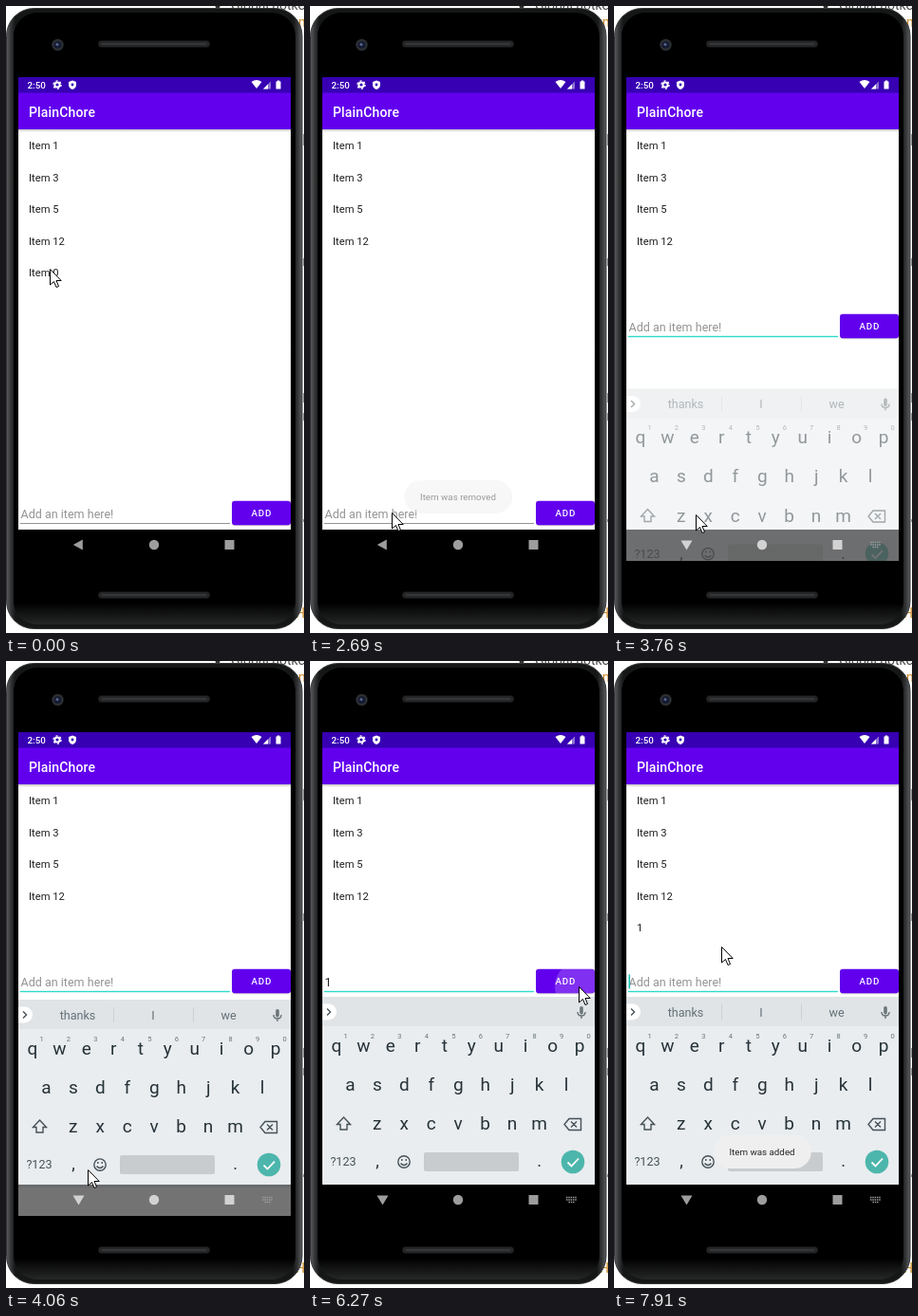
Write an HTML page that moves like this. It is 314 by 661 pixels and loops after 8 s.

```html
<!DOCTYPE html>
<html lang="en">
<head>
<meta charset="utf-8">
<title>Todo list demo</title>
<style>
html, body { margin: 0; width: 100%; height: 100%; overflow: hidden; background: #fff; }
svg { display: block; width: 314px; height: 661px; font-family: Roboto, "Noto Sans", sans-serif; }
.mid { text-anchor: middle; }
</style>
</head>
<body>
<svg viewBox="0 0 314 661">
  <defs>
    <clipPath id="screen"><rect x="13" y="75" width="287" height="510"/></clipPath>
    <clipPath id="buttonShape"><rect x="238" y="521.700" width="62" height="25.600" rx="3"/></clipPath>
    <linearGradient id="rim">
      <stop offset="0" stop-color="#5a5c5e"/><stop offset=".016" stop-color="#303233"/>
      <stop offset=".03" stop-color="#151616"/><stop offset=".97" stop-color="#151616"/>
      <stop offset=".984" stop-color="#303233"/><stop offset="1" stop-color="#5a5c5e"/>
    </linearGradient>
    <linearGradient id="chin" x2="0" y2="1">
      <stop offset=".965" stop-color="#000"/><stop offset="1" stop-color="#262727"/>
    </linearGradient>
    <linearGradient id="barShade" x2="0" y2="1">
      <stop offset="0" stop-color="#000" stop-opacity=".25"/><stop offset="1" stop-color="#000" stop-opacity="0"/>
    </linearGradient>
  </defs>

  <!-- page behind the phone -->
  <g font-size="14">
    <circle cx="223" cy="0" r="2.500" fill="#333"/>
    <text x="237" y="4" fill="#4a4a4a">Global hotkeys</text>
    <text x="308" y="22" fill="#d08a28">m</text>
    <text x="305" y="645" fill="#d08a28">H</text>
    <path d="M313.500 135v12M313.500 266v8M313.500 408v10M313.500 429v8M313.500 541v3" stroke="#999"/>
  </g>

  <!-- phone -->
  <rect x="0" y="178" width="3" height="84" rx="1" fill="#77797b"/>
  <rect x=".5" y="2.500" width="311.500" height="654" rx="29" fill="url(#rim)" stroke="#333637"/>
  <rect x="8" y="7" width="297" height="645" rx="25" fill="url(#chin)"/>
  <g fill="#252627" stroke="#111">
    <rect x="97" y="36.500" width="118" height="7" rx="3.500"/>
    <rect x="97" y="617.500" width="118" height="7" rx="3.500"/>
  </g>
  <path d="M101 40h110M101 621h110" stroke="#3b3c3d" stroke-width="1.500"/>
  <circle cx="54.500" cy="41" r="6.200" fill="#2c2f33"/>
  <circle cx="54.500" cy="41" r="3.800" fill="#141a30"/>
  <circle cx="54" cy="40.500" r="1.500" fill="#5a668c"/>

  <g clip-path="url(#screen)">
    <rect x="13" y="130" width="287" height="422" fill="#fff"/>
    <rect x="13" y="130" width="287" height="3" fill="url(#barShade)"/>
    <rect x="13" y="75" width="287" height="17" fill="#3700b3"/>
    <rect x="13" y="91.500" width="287" height="38.500" fill="#6200ee"/>
    <g fill="#fff">
      <text x="22.500" y="87" font-size="9.800" font-weight="500">2:50</text>
      <text x="24" y="116.500" font-size="14" font-weight="500" letter-spacing=".15">PlainChore</text>
      <circle cx="54" cy="83" r="2.600" fill="none" stroke="#fff" stroke-width="2"/>
      <circle cx="54" cy="83" r="4.100" fill="none" stroke="#fff" stroke-width="1.300" stroke-dasharray="2.200 2.090"/>
      <path d="M70 78.500l4 1.500v3q0 3.500-4 5q-4-1.500-4-5v-3z"/>
      <circle cx="70" cy="83" r="1.400" fill="#3700b3"/>
      <path d="M258.500 80q5.500-4 11 0l-5.500 7zM284.500 79.500h1.300v-1h2.400v1h1.300v8h-5z"/>
      <path d="M271 87.500l8-8v8z" opacity=".45"/><path d="M271 87.500l5-5v5z"/>
    </g>
    <g id="items" fill="#202020" font-size="11.200"></g>

    <g id="form">
      <text id="field" x="15.500" y="540" font-size="12.560"></text>
      <rect id="caret" x="15.500" y="527.500" width="1.400" height="15" fill="#03bfae"/>
      <rect id="underline" x="15" width="221"/>
      <rect x="238.500" y="523" width="61.500" height="25.300" rx="3" fill="#000" opacity=".18"/>
      <rect x="238" y="521.700" width="62" height="25.600" rx="3" fill="#6200ee"/>
      <circle id="ripple" cx="284" cy="540" fill="#fff" clip-path="url(#buttonShape)"/>
      <text class="mid" x="269.400" y="538" font-size="9.770" font-weight="500" letter-spacing=".87" fill="#fff">ADD</text>
    </g>

    <rect id="navFill" x="13" y="552" width="287" height="33" fill="#fff"/>
    <g id="keyboard"></g>
    <rect id="navShade" x="13" y="552" width="287" height="33"/>
    <g id="nav" fill="#9d9d9d">
      <path id="back"/>
      <circle cx="156" cy="568" r="5.200"/>
      <rect x="230.500" y="563" width="10" height="10" rx=".5"/>
      <path id="imeIcon" d="M270 565.500h11M270 568h11M272.500 570.500h6" stroke="#9d9d9d" stroke-width="1.400" stroke-dasharray="1.500 .8"/>
    </g>
    <g id="toast">
      <rect id="toastBox" y="500" height="35" rx="17.500" fill="#efefef"/>
      <text id="toastText" class="mid" x="156" y="521.300" font-size="9.770" fill="#252525"></text>
    </g>
  </g>
  <path id="pointer" d="M.5 .5V17L4.500 13.500L7 19.500L9.500 18.500L7 12.500H12.200Z" fill="#fff" stroke="#000" stroke-linejoin="round"/>
</svg>

<script>
const LOOP = 8000;
const $ = id => document.getElementById(id);
const set = (el, attrs) => { for (const k in attrs) el.setAttribute(k, attrs[k]); };
const show = (el, on) => set(el, { visibility: on ? 'visible' : 'hidden' });
const clamp = x => Math.max(0, Math.min(1, x));
const ramp = (t, from, to) => clamp((t - from) / (to - from));
const between = (t, from, to) => t >= from && t < to;

const label = (x, y, size, text, extra = 'class="mid"') =>
  `<text x="${x}" y="${y}" font-size="${size}" ${extra}>${text}</text>`;

$('items').innerHTML = ['Item 1', 'Item 3', 'Item 5', 'Item 12', 'Item 0', '1']
  .map((name, i) => label(24, 151.4 + 33.4 * Math.min(i, 4), 11.2, name, '')).join('');
const [removedItem, addedItem] = [...$('items').children].slice(-2);

function buildKeyboard() {
  const row = (keys, x, y) => [...keys].map((k, i) => label(x + 28.45 * i, y, 19, k)).join('');
  const digits = [...'1234567890'].map((d, i) => label(37.5 + 28.45 * i, 397.5, 7.5, d)).join('');
  return `
    <rect x="13" y="354" width="287" height="198" fill="#e9edf0"/>
    <rect x="13" y="354" width="287" height="31" fill="#e0e4e6"/>
    <path d="M13 361.500h6.500a8.500 8.500 0 0 1 0 17H13z" fill="#fff"/>
    <g fill="none" stroke="#465157" stroke-width="1.400">
      <path d="M18 366.500l3.500 3.500l-3.500 3.500"/>
      <path d="M282 370q0 4 4 4t4-4M286 374v3" stroke="#6b757a"/>
      <path d="M35.500 481l7 7.500h-3.500v5.500h-7v-5.500h-3.500z"/>
      <path d="M273 482.500h12.500v12H273l-5-6zM275 485.500l6 6M281 485.500l-6 6"/>
      <circle cx="99" cy="528" r="6.200"/><path d="M95.500 529.500q3.500 4 7 0"/>
      <path d="M96.800 525v2M101.200 525v2"/>
    </g>
    <rect x="284.200" y="364" width="3.600" height="8.500" rx="1.800" fill="#6b757a"/>
    <g id="suggestions" fill="#637078">
      ${label(75.5, 374.5, 12.6, 'thanks')}${label(155, 374.5, 12.6, 'I')}${label(234.5, 374.5, 12.6, 'we')}
      <path d="M113.500 362v16M197.500 362v16" stroke="#cbd0d3"/>
    </g>
    <g fill="#263238">
      ${row('qwertyuiop', 28, 411.5)}${row('asdfghjkl', 42.5, 452.5)}${row('zxcvbnm', 70.8, 494)}
      ${label(71, 533, 18, ',')}${label(241.5, 533, 18, '.')}
    </g>
    <g fill="#6b757a">${digits}</g>
    <g fill="#465157">${label(35, 532, 12.6, '?123')}</g>
    <rect x="120" y="518" width="100" height="20" rx="2" fill="#c8cccf"/>
    <circle cx="277" cy="528" r="12.300" fill="#4db6ac"/>
    <path d="M271.500 528.500l4 4l7.500-8" fill="none" stroke="#fff" stroke-width="1.800"/>`;
}
$('keyboard').innerHTML = buildKeyboard();

// time, x, y of the pointer tip
const path = [
  [0, 46, 277], [840, 46, 277], [1250, 50, 306], [1650, 70, 431], [1820, 70, 431],
  [2400, 85, 528], [2690, 86, 534], [3240, 86, 536], [4900, 86, 536], [4990, 196, 514],
  [5300, 258, 405], [5600, 290, 300], [5990, 283, 343], [6750, 283, 343],
  [7090, 215, 330], [7400, 155, 312], [7850, 113, 301], [LOOP, 113, 301]
];

function pointerAt(t) {
  const i = path.findIndex(p => p[0] > t);
  const [a, b] = [path[i - 1], path[i]];
  const p = ramp(t, a[0], b[0]);
  return [1, 2].map(k => Math.round(a[k] + (b[k] - a[k]) * p));
}

function drawForm(t) {
  const focused = t >= 2970, typed = between(t, 4490, 6950);
  set($('form'), { transform: `translate(0 ${t >= 3640 ? -197 : 0})` });
  $('field').textContent = typed ? '1' : 'Add an item here!';
  set($('field'), { fill: typed ? '#202020' : '#949494' });
  set($('underline'), focused
    ? { y: 544.8, height: 1.4, fill: '#2edccb' }
    : { y: 545, height: 0.8, fill: '#777' });
  show($('caret'), between(t, 6950, 7400) || t >= 7850);
  const pressed = t - 6120;
  set($('ripple'), {
    r: pressed > 0 ? 8 + pressed * 0.12 : 0,
    opacity: 0.19 * (1 - ramp(t, 6600, 6900))
  });
}

function drawKeyboard(t) {
  const p = ramp(t, 3560, 4160), visible = t >= 3640;
  const sliding = visible && p < 1;
  show($('keyboard'), visible);
  set($('keyboard'), {
    transform: `translate(0 ${112 * (1 - p) ** 2})`,
    opacity: clamp(p * 1.5)
  });
  show($('navFill'), sliding);
  set($('navShade'), { opacity: sliding ? 0.55 : 1 });
  set($('nav'), { fill: sliding ? '#d2d2d2' : '#9d9d9d' });
  set($('suggestions'), { opacity: between(t, 4490, 7210) ? 0 : 1 });
  set($('back'), { d: t >= 3120 ? 'M70.500 563.500h12l-6 10z' : 'M80.800 562.500v11l-10-5.500z' });
  show($('imeIcon'), t >= 3120);
}

function drawToast(t) {
  const adding = t > 5000;
  const opacity = adding ? ramp(t, 7000, 7250) : ramp(t, 960, 1200) * (1 - ramp(t, 2540, 2820));
  const width = adding ? 103 : 114;
  set($('toast'), { opacity });
  set($('toastBox'), { x: 156.3 - width / 2, width });
  $('toastText').textContent = adding ? 'Item was added' : 'Item was removed';
}

function draw(t) {
  set(removedItem, { opacity: 1 - ramp(t, 1130, 1290) });
  set(addedItem, { opacity: ramp(t, 7180, 7320) });
  drawForm(t);
  drawKeyboard(t);
  drawToast(t);
  set($('pointer'), { transform: `translate(${pointerAt(t)})` });
}

const start = performance.now();
function tick() {
  draw((performance.now() - start) % LOOP);
  requestAnimationFrame(tick);
}
tick();
</script>
</body>
</html>
```
